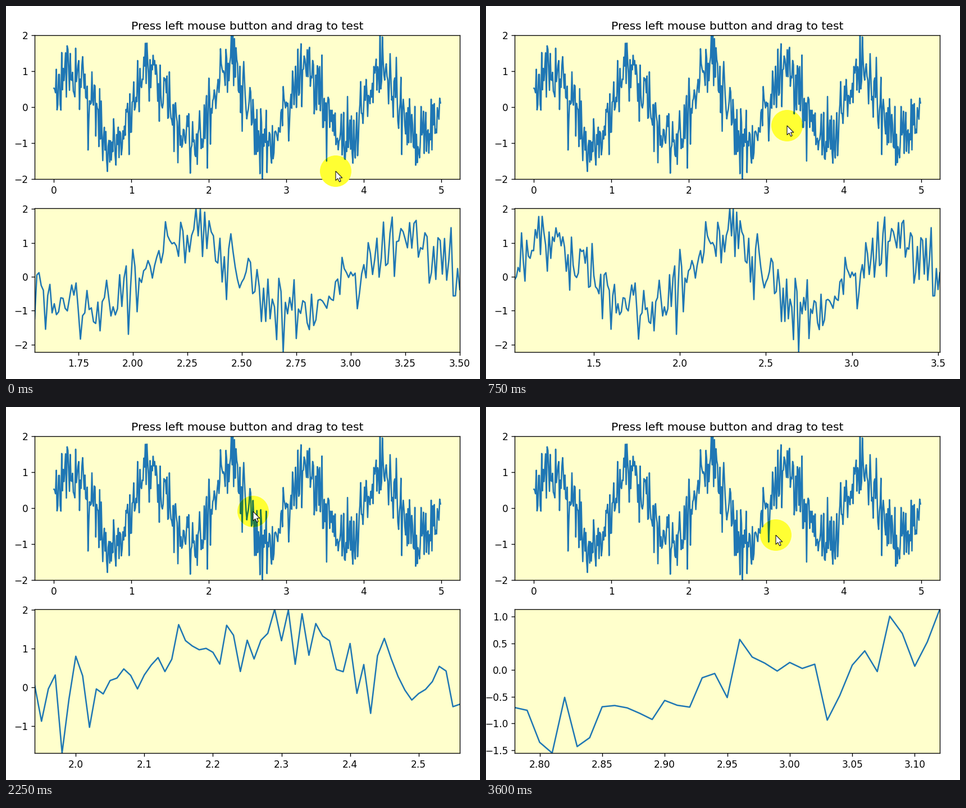
Recreate the animation shown at these times as a matplotlib script. Size 844 by 664 pixels, loop 3750 ms.

```python
import numpy as np
import matplotlib.pyplot as plt
from matplotlib.animation import FuncAnimation
from matplotlib.colors import to_rgb
from matplotlib.patches import Circle, Polygon, Rectangle
from matplotlib.transforms import Affine2D

W, H, DPI = 844, 664, 122
FRAMES, STEP = 25, 150
CREAM, BLUE = "#ffffcc", "#1f77b4"
LEFT, WIDE, TOP, TALL = 51, 757, 52, 256
LAG = 0.07  # frames by which a selection trails the pointer

# Pointer stops: arrival, departure (in frames), x, y (pixels from top left)
STOPS = [
    (0, 0, 587, 294), (0.92, 0.92, 228, 190), (2.92, 4, 570.5, 207),
    (5, 5, 536, 213), (7, 8, 352.5, 211), (9, 12, 439, 219),
    (13, 14, 360, 202), (15, 15, 440, 186), (17, 17, 468.5, 230),
    (19, 19, 563, 228), (21, 24, 516, 228)]
DRAGS = [(0.92, 5), (8, 12), (17, 23)]  # press, release

np.random.seed(19680801)
x = np.arange(0.0, 5.0, 0.01)
y = np.sin(2 * np.pi * x) + 0.5 * np.random.randn(len(x))
X0, X1 = x[0] - 0.05 * x[-1], 1.05 * x[-1]


def pointer(t):
    times = [s for stop in STOPS for s in stop[:2]]
    return [np.interp(t, times, np.repeat([s[k] for s in STOPS], 2))
            for k in (2, 3)]


def to_data(px):
    return X0 + (px - LEFT) / WIDE * (X1 - X0)


def view(n):
    """Range of x selected by the latest finished drag."""
    lo, hi = 1.545, 3.505
    for press, release in DRAGS:
        if n >= release:
            lo, hi = (to_data(pointer(t)[0]) for t in (press, release - 1))
    return slice(*np.searchsorted(x, (lo, hi)))


def flip_blue(color):
    r, g, b = to_rgb(color)
    return r, g, 1 - b


# The tiny margin keeps the pixel size from rounding down
fig = plt.figure(figsize=((W + 1e-3) / DPI, (H + 1e-3) / DPI), dpi=DPI,
                 facecolor="white")
pixels = Affine2D().scale(1 / W, -1 / H).translate(0, 1) + fig.transFigure


def panel(edge):
    box = [LEFT / W, 1 - (edge + TALL) / H, WIDE / W, TALL / H]
    return fig.add_axes(box, facecolor=CREAM)


def put(artist, z):
    artist.set_transform(pixels)
    artist.set_zorder(z)
    top.add_artist(artist)
    artist.set_clip_on(False)
    return artist


def band(color, z):
    return put(Rectangle((0, TOP), 0, TALL, fc=color, alpha=0.5, lw=0), z)


top, low = panel(TOP), panel(TOP + 308)
top.plot(x, y, color=BLUE)
top.set(xlim=(X0, X1), ylim=(-2, 2))
top.set_title("Press left mouse button and drag to test")
zoom, = low.plot([], [], color=BLUE)
span = band("red", 5)

# The pointer's halo inverts the blue channel of what lies below it
halo = put(Circle((0, 0), 28, fc=flip_blue(CREAM), lw=0), 10)
curve, = top.plot(x, y, color=flip_blue(BLUE), zorder=11)
tint = band(flip_blue("red"), 12)

ring = put(Circle((0, 0), 5.5, fc="none", ec="#e60020", lw=1.55), 13)
ARROW = np.array([(0, 0), (0, 16.5), (3.8, 13), (6.6, 19), (9.2, 17.9),
                  (6.6, 12), (11.8, 12)])
arrow = put(Polygon(ARROW, fc="white", ec="black", lw=0.6), 14)


def draw(n):
    spot = pointer(n)
    halo.center = ring.center = spot
    arrow.set_xy(ARROW + spot)
    for part in (curve, tint):
        part.set_clip_on(True)
        part.set_clip_path(halo)

    drag = [d for d in DRAGS if d[0] <= n < d[1]]
    ring.set_visible(any(n < release - 1 for _, release in drag))
    for part in (span, tint):
        part.set_visible(bool(drag))
        if drag:
            press = drag[0][0]
            start = pointer(press)[0]
            edge = pointer(max(press, n - LAG))[0]
            part.set(x=start, width=edge - start)

    part = view(n)
    xs, ys = x[part], y[part]
    zoom.set_data(xs, ys)
    low.set(xlim=(xs[0], xs[-1]), ylim=(ys.min(), ys.max()))
    return []


anim = FuncAnimation(fig, draw, frames=FRAMES, interval=STEP, repeat=True,
                     repeat_delay=0, init_func=lambda: [], blit=False)
plt.show()
```
